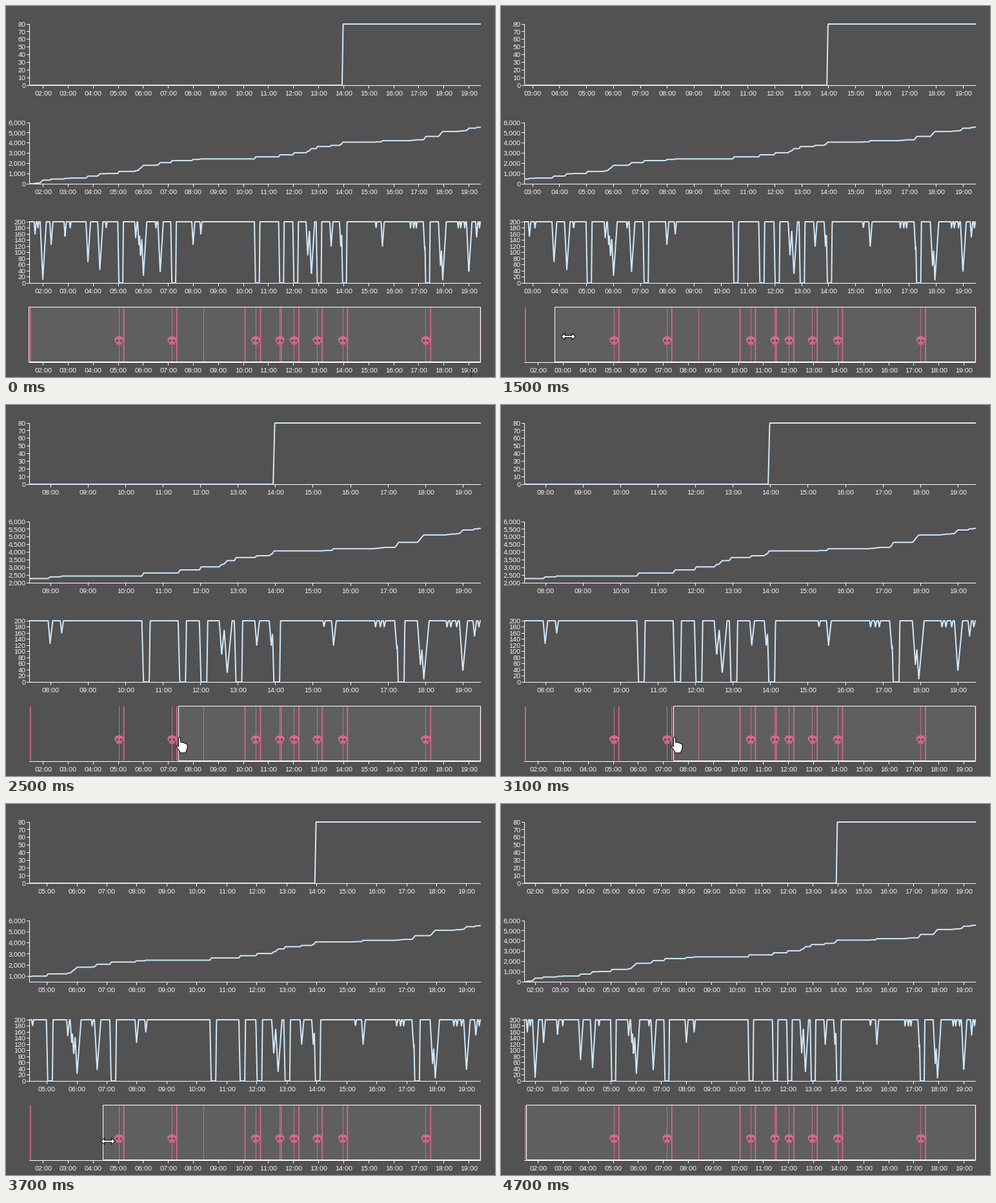
Animation of 758x576 px, one loop 5000 ms. Source, as a matplotlib script:

```python
import math

import matplotlib.pyplot as plt
import numpy as np
from matplotlib.animation import FuncAnimation
from matplotlib.patches import Circle, Ellipse, Polygon, Rectangle

W, H, DPI = 758, 576, 64
PX = 72 / DPI                      # one pixel in points
LEFT, RIGHT, HEIGHT = 36, 736, 95
FRAMES, STEP = 50, 100

BG, SELECTED = "#525252", "#5f5f5f"
LINE, PINK, SOCKET = "#cfe7fa", "#d4698a", "#59505a"

plt.rcParams.update({"font.family": "Liberation Sans", "path.snap": False,
                     "text.hinting": "native", "text.hinting_factor": 1})
fig = plt.figure(figsize=(W / DPI, H / DPI), dpi=DPI, facecolor=BG)
ax = fig.add_axes([0, 0, 1, 1])
ax.set_xlim(0, W)
ax.set_ylim(H, 0)
ax.axis("off")


def hour_pos(hour):
    """Place of an hour on the overview axis."""
    return 57.6 + (hour - 2) * 38.82


# ---- data: health lost in wounds and deaths, x in overview pixels ----
FULL = 200
DEATHS = (175.3, 257.4, 387, 424.6, 446.6, 482.8, 522, 650.8)
SESSIONS = (37.8, 370.6, 426.6, 735.6)
SCRATCHES = (49.5, 99.5, 155.3, 232.5, 573.6, 627, 632, 636, 701, 705, 711, 734)
WOUNDS = [(45, 160), (57, 12), (70, 126), (91.5, 153), (127, 70), (145.5, 44),
          (201, 148), (206, 126), (208.6, 86), (213, 25), (239, 37),
          (290, 126), (302, 160), (467.7, 90), (473.4, 28), (504, 120),
          (519, 120), (583.5, 120), (649, 110), (673.5, 57), (677, 10),
          (717.4, 35), (729.5, 150)]
WOUNDS += [(x, 180) for x in SCRATCHES]
HEALED = 1.45                      # damage per visible point lost in a wound

grid = np.linspace(LEFT, RIGHT, 2801)
lost = np.zeros_like(grid)
total = np.zeros_like(grid)
for x, low in WOUNDS:
    drop = FULL - low
    half = 0.8 + drop / 45
    fall, rise = x - 0.8 * half, x + 1.1 * half
    lost = np.maximum(lost, np.interp(grid, [fall, x, rise], [0, drop, 0]))
    total += np.interp(grid, [fall, x], [0, HEALED * drop])
for x in DEATHS:
    lost = np.maximum(lost, np.interp(grid, [x - 2, x - 0.3, x + 5.7, x + 6.6],
                                      [0, FULL, FULL, 0]))
    total += np.interp(grid, [x - 2, x], [0, FULL])
health = FULL - lost
switch = np.interp(grid, [521, 522.6], [0, 80])


# ---- drawing helpers, each returning its artists ----
def crisp(value):
    """Centre of the pixel that holds the value."""
    return math.floor(value) + 0.5


def stroke(xs, ys, color="white", width=1.0, z=2, **style):
    return ax.plot(xs, ys, color=color, lw=width * PX, zorder=z,
                   solid_capstyle="butt", **style)


def label(x, baseline, text, align):
    return [ax.text(x, baseline, text, color="white", fontsize=10 * PX,
                    ha=align, va="baseline", zorder=3)]


def zoom(x, left):
    return LEFT + (x - left) / (RIGHT - left) * (RIGHT - LEFT)


def time_axis(y, left):
    made = []
    for hour in range(2, 20):
        if hour_pos(hour) >= left:
            x = zoom(hour_pos(hour), left)
            made += stroke([crisp(x)] * 2, [y, y + 5])
            made += label(x, y + 16, f"{hour:02d}:00", "center")
    return made


def value_axis(bottom, low, high, step):
    made = []
    for value in range(math.ceil(low / step) * step, high + 1, step):
        y = bottom - HEIGHT * (value - low) / (high - low)
        made += stroke([LEFT - 4, LEFT], [crisp(y)] * 2)
        made += label(30.3, y + 3.7, f"{value:,}", "right")
    return made


def curve(values, bottom, low, high, left):
    after = grid > left
    xs = np.r_[left, grid[after]]
    ys = np.r_[np.interp(left, grid, values), values[after]]
    return stroke(zoom(xs, left), bottom - HEIGHT * (ys - low) / (high - low),
                  LINE, 2, 4, solid_joinstyle="round")


def skull(x):
    style = dict(color=PINK, lw=0, zorder=3)
    ax.add_patch(Ellipse((x, 518.4), 14.4, 11.4, **style))
    ax.add_patch(Rectangle((x - 4, 521), 8, 5, **style))
    for side in (-1, 1):
        ax.add_patch(Circle((x + 3 * side, 519.6), 1.9, color=SOCKET, lw=0,
                            zorder=3.1))
        stroke([x + 1.4 * side] * 2, [524.5, 526.2], SOCKET, 0.6, 3.1)


def pointer(points, x, y):
    return [ax.add_patch(Polygon(np.array(points) + (x, y), fc="white",
                                 ec="black", lw=PX, zorder=8))]


ARROW = [(0, 0), (0, 16.5), (3.8, 13), (6.4, 19), (8.8, 18), (6.3, 12.2),
         (11.4, 11.8)]
HAND = [(-1.6, 1), (0, -0.4), (1.6, 1), (1.8, 8), (4, 7.5), (8, 9), (12, 11),
        (12, 17), (9.5, 24), (0.5, 24), (0.5, 22), (-5, 14.5), (-4, 12.5),
        (-1.6, 14.5)]
half_arrow = [(-11, 0), (-5.5, -5), (-5.5, -1.6), (5.5, -1.6), (5.5, -5)]
RESIZE = half_arrow + [(-x, -y) for x, y in half_arrow]


# ---- motion ----
def ease(t, start, end):
    u = min(max((t - start) / (end - start), 0), 1)
    return (1 - math.cos(math.pi * u)) / 2


def brush_left(t):
    return LEFT + 232.4 * ease(t, 1187, 2229) - 228.2 * ease(t, 3200, 4182)


def cursor(t):
    y = np.interp(t, [700, 900, 1200, 2000, 2500, 3100, 4200, 4300],
                  [574, 508, 515, 510, 516, 516, 530, 556])
    if t < 100:
        return (stroke([721.5] * 2, [563, 576], "#151515", 1, 8)
                + stroke([719.5, 723.5], [563.5] * 2, "#303030", 1, 8))
    if 700 <= t < 1100:
        return pointer(ARROW, np.interp(t, [700, 900], [52, 33]), y)
    if 1100 <= t < 2500:
        return pointer(RESIZE, brush_left(t + 55) + 4, y)
    if 2500 <= t < 3200:
        return pointer(HAND, 269, y)
    if 3200 <= t < 4300:
        return pointer(RESIZE, brush_left(t) + 7, y)
    if 4300 <= t < 4400:
        return pointer(ARROW, 46, y)
    return []


# ---- fixed parts ----
for base in (123, 276, 430):
    stroke([LEFT + 0.5] * 2, [base - HEIGHT, base + 1])
    stroke([LEFT, RIGHT], [base + 0.5] * 2)
value_axis(123, 0, 80, 10)
value_axis(430, 0, FULL, 20)
stroke([LEFT, RIGHT], [553.5] * 2)
time_axis(553, LEFT)


def marker(x, width):
    stroke([x, x], [468, 552], PINK, width)


for x in SESSIONS:
    marker(x, 1.8)
for x in DEATHS:
    marker(crisp(x), 1)
    skull(x)
    revival = x + 7.4
    if not any(x < session < revival for session in SESSIONS):
        marker(revival, 1.8)
marker(306.5, 1)

brush = ax.add_patch(Rectangle((0, 467.5), 1, 85, fc=SELECTED, lw=0, zorder=1))
border, = stroke([], [], "white", 1, 5, solid_joinstyle="miter")
moving = []


def draw(i):
    while moving:
        moving.pop().remove()
    t = i * STEP
    left = brush_left(t)

    edge, right = crisp(left - 1), RIGHT - 0.5
    brush.set_x(edge)
    brush.set_width(right - edge)
    border.set_data([edge, right, right, edge, edge],
                    [467.5, 467.5, 552.5, 552.5, 467.5])

    low = int(np.interp(left, grid, total) // 500) * 500
    moving.extend(value_axis(276, low, 6000, 1000 if low < 1000 else 500))
    for values, base, bottom, top in ((switch, 123, 0, 80),
                                      (total, 276, low, 6000),
                                      (health, 430, 0, FULL)):
        moving.extend(time_axis(base, left))
        moving.extend(curve(values, base, bottom, top, left))
    moving.extend(cursor(t))
    return moving


anim = FuncAnimation(fig, draw, frames=FRAMES, interval=STEP,
                     init_func=lambda: draw(0), repeat=True, repeat_delay=0)
plt.show()
```
